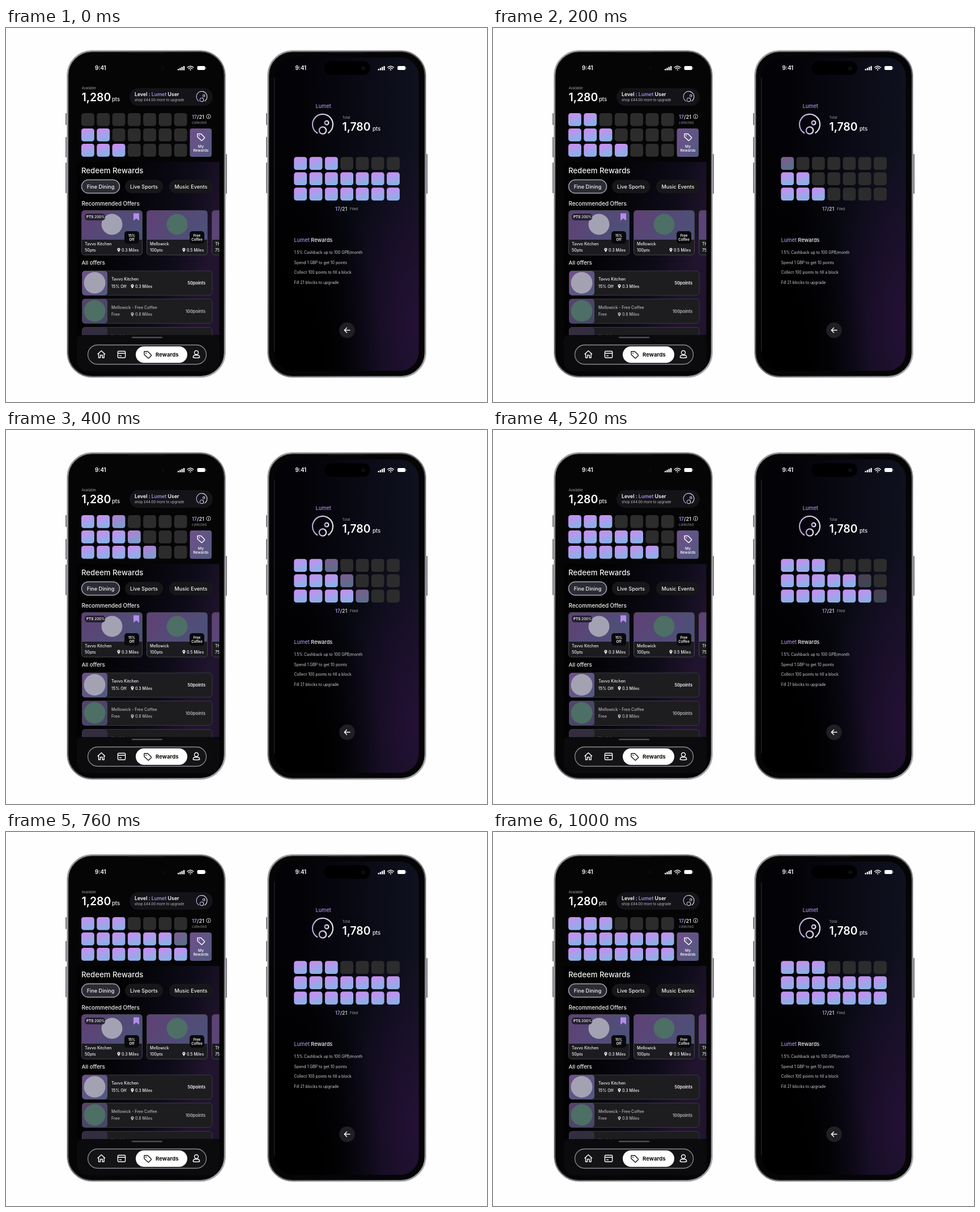
Recreate the animation shown at these times as an HTML page. Size 849 px wide and 659 px high, loop 1.08 s.

```html
<!DOCTYPE html>
<html lang="en">
<head>
<meta charset="utf-8">
<title>Rewards app</title>
<style>
  html, body { margin: 0; width: 100%; height: 100%; overflow: hidden; background: #fefefe; }
  svg { display: block; width: 849px; height: 659px; font-family: Inter, "Open Sans", sans-serif; }
  .line { fill: none; stroke: #fff; stroke-width: 1.4; stroke-linecap: round; stroke-linejoin: round; }
</style>
</head>
<body>
<svg id="stage" viewBox="0 0 849 659">
  <defs>
    <linearGradient id="tile" x1=".2" y1="0" x2=".6" y2="1">
      <stop offset=".1" stop-color="#c68ff0"/><stop offset="1" stop-color="#84b4e6"/>
    </linearGradient>
    <linearGradient id="art" x1="0" y1="0" x2="1" y2=".4">
      <stop stop-color="#604076"/><stop offset="1" stop-color="#4d5078"/>
    </linearGradient>
    <linearGradient id="button" x1="0" y1="0" x2="1" y2="1">
      <stop stop-color="#70508a"/><stop offset="1" stop-color="#515a80"/>
    </linearGradient>
    <linearGradient id="ring" x1="0" y1="0" x2="1" y2="0">
      <stop stop-color="#b9a2d8"/><stop offset="1" stop-color="#e8e8f0"/>
    </linearGradient>
    <linearGradient id="metal" x1="0" y1="0" x2="1" y2="1">
      <stop stop-color="#909094"/><stop offset=".5" stop-color="#5c5c62"/><stop offset="1" stop-color="#a2a2a8"/>
    </linearGradient>
    <linearGradient id="listGlow" x1="0" y1="0" x2="1" y2=".35">
      <stop offset=".3" stop-color="#020203"/><stop offset=".75" stop-color="#0d0b18"/><stop offset="1" stop-color="#21142e"/>
    </linearGradient>
    <linearGradient id="screenBlue" x1="0" y1="0" x2="1" y2="0">
      <stop offset=".2" stop-color="#030307"/><stop offset=".6" stop-color="#090a14"/><stop offset="1" stop-color="#10111f"/>
    </linearGradient>
    <radialGradient id="screenPurple" cx="1" cy=".84" r=".55">
      <stop stop-color="#28103a" stop-opacity=".85"/><stop offset="1" stop-color="#28103a" stop-opacity="0"/>
    </radialGradient>
    <radialGradient id="screenDark" cx="0" cy="1" r=".75">
      <stop offset=".4" stop-color="#000"/><stop offset="1" stop-color="#000" stop-opacity="0"/>
    </radialGradient>
    <clipPath id="listArea"><rect x="125" y="236" width="251.5" height="305"/></clipPath>
  </defs>
</svg>
<script>
const stage = document.getElementById("stage");
const LILAC = "#a98ce0", TIER = "Lumet";
const EATERY = "Tavvo Kitchen", CAFE = "Mellowick";

const rect = (x, y, w, h, r, fill, extra = "") =>
  `<rect x="${x}" y="${y}" width="${w}" height="${h}" rx="${r}" fill="${fill}" ${extra}/>`;
const circle = (x, y, r, fill, extra = "") =>
  `<circle cx="${x}" cy="${y}" r="${r}" fill="${fill}" ${extra}/>`;
const text = (x, y, size, str, fill = "#f2f2f4", weight = 500, anchor = "start") =>
  `<text x="${x}" y="${y}" font-size="${size}" fill="${fill}" font-weight="${weight}" text-anchor="${anchor}">${str}</text>`;
const line = (d, extra = "") => `<path class="line" d="${d}" ${extra}/>`;
const group = (x, y, body, extra = "") => `<g transform="translate(${x} ${y})" ${extra}>${body}</g>`;
const lilac = str => `<tspan fill="${LILAC}">${str}</tspan>`;
const border = (color, width = 1) => `stroke="${color}" stroke-width="${width}"`;

const pin = (x, y) =>
  `<path d="M${x} ${y + 4}c-1-2-2.6-3-2.6-5a2.6 2.6 0 0 1 5.2 0c0 2-1.6 3-2.6 5z" fill="#eee"/>` + circle(x, y - 1, .9, "#222");
const tag = (x, y, color) => group(x, y,
  line("M-6-5.5h6.2l6 6q.8.8 0 1.6l-4 4q-.8.8-1.6 0l-6.6-6.2z", `style="stroke:${color}"`) + circle(-2.8, -2.3, .9, color));
const badge = (x, y, scale) => `<g transform="translate(${x} ${y}) scale(${scale})" fill="none" stroke="url(#ring)" stroke-width="2.2">
  <path d="M-9 15.5A18 18 0 1 1 9.5 15.2"/><circle cx="7" cy="-3" r="3.4"/><circle cx="0" cy="10.5" r="6.2"/></g>`;

function phone(x) {
  const buttons = [[-2, 111, 21], [-2, 153, 36], [-2, 198, 54], [280, 183, 70]]
    .map(([bx, by, h]) => rect(bx, by, 3, h, 1, "#77777d")).join("");
  return group(x, 39, buttons +
    rect(.7, .7, 279.6, 576, 44, "#141416", border("#c3c3c7", 1.4)) +
    rect(2.2, 2.2, 276.6, 573, 42.5, "#050506", border("url(#metal)", 2)) +
    rect(108, 3.5, 64, 1.6, .8, "#1b1b1e"));
}

function statusBar(x) {
  const bars = [0, 1, 2, 3].map(i => rect(146 + i * 3.3, 72 - i * 1.7, 2.3, 2.6 + i * 1.7, .6, "#fff")).join("");
  return group(x, 0, text(0, 74, 9.8, "9:41", "#fff", 600) + bars +
    line("M163.2 69.5q5.3-4.6 10.6 0M165.2 71.7q3.3-2.8 6.6 0") + circle(168.5, 73.7, 1.1, "#fff") +
    rect(180.5, 67, 14, 7, 2, "#fff") + rect(195.2, 69.2, 1, 2.6, .5, "#aaa"));
}

function tiles(id, x, y) {
  let body = "";
  for (let row = 0; row < 3; row++)
    for (let col = 0; col < 7; col++) {
      const px = x + col * 27.3, py = y + (2 - row) * 27;
      body += rect(px, py, 22.8, 22.8, 4.5, "#2c2c2d") +
        rect(px, py, 22.8, 22.8, 4.5, "url(#tile)", `data-row="${row}" data-col="${col}"`);
    }
  return `<g id="${id}">${body}</g>`;
}

function card(x, name, points, miles, logo, offer) {
  const label = offer.map((s, i) => text(89, 46.5 + i * 7.6, 6, s, "#fff", 600, "middle")).join("");
  return group(x, 321,
    rect(.5, .5, 107, 78.5, 5, "#1b1b20", border("#45454d")) +
    `<path d="M1 52V5q0-4 4-4h98q4 0 4 4v47z" fill="url(#art)"/>` + circle(54, 25, 18.5, logo) +
    rect(76, 37, 26, 22, 5, "#09090b") + label +
    text(6, 61.5, 7, name) + text(6, 72.5, 7.2, points) +
    pin(66, 70) + text(71, 72.5, 7, miles));
}

function row(y, name, deal, miles, points, logo, dim) {
  return group(134, y,
    rect(.5, .5, 229.5, 43, 5, "#1d1d20", border("#39393f")) +
    rect(.5, .5, 44.5, 43, 5, "url(#button)", `opacity="${dim}"`) + circle(22.5, 21.5, 19, logo) +
    `<g opacity="${dim}">` + text(52, 17.5, 7.1, name) + text(52, 30, 7.1, deal) +
    pin(89, 27.5) + text(94, 30, 7, miles) + text(218, 24.5, 7.4, points, "#f2f2f4", 600, "end") + `</g>`);
}

const chip = (x, w, label, active) =>
  rect(x, 267.5, w, 23.5, 11.75, active ? "#2b2b33" : "#17171a", active ? border("#a5a5b8", 1.5) : "") +
  text(x + w / 2, 282.5, 9.1, label, "#f2f2f4", 500, "middle");

const points = (x, y, amount, label) =>
  text(x, y - 21, 6, label, "#a0a0a4", 400) + text(x, y, 19.4, amount, "#fff", 600) + text(x + 53.5, y, 9.5, "pts");

function home() {
  const header = points(133.5, 129, "1,280", "Available") +
    rect(218, 106, 147, 31, 15.5, "#131318") +
    text(227, 119.7, 8.8, `Level : ${lilac(TIER)} User`, "#fff", 600) +
    text(227, 129, 6.2, "shop £44.00 more to upgrade", "#bcbcc2", 400) + badge(345.5, 121, .52) +
    tiles("left", 133, 150) +
    text(328, 160, 9, `${lilac("17")}/21`, "#ddd", 600) +
    circle(357.5, 156, 3.8, "none", border("#ddd", .9)) + line("M357.5 155.6v2.3M357.5 153.9v.1", `style="stroke-width:1"`) +
    text(328, 169, 6, "collected", "#929298", 400) +
    rect(324.5, 177, 38.5, 50, 4, "url(#button)") + tag(344, 192, "#fff") +
    text(344, 210.5, 6.6, "My", "#fff", 500, "middle") + text(344, 218, 6.6, "Rewards", "#fff", 500, "middle");

  const list = rect(125, 236, 252, 306, 0, "url(#listGlow)") +
    text(133, 256, 13.2, "Redeem Rewards") +
    chip(133.5, 67, "Fine Dining", true) + chip(210, 67, "Live Sports") + chip(288, 77, "Music Events") +
    text(133.5, 312.5, 9.8, "Recommended Offers") +
    card(133, EATERY, "50pts", "0.3 Miles", "#a3a2b2", ["15%", "Off"]) +
    rect(139, 327, 36, 12, 5, "#25202f") + text(142, 335.3, 6.3, "<tspan font-weight='700'>PTS</tspan> 200%") +
    `<path d="M225 326.5h10v13l-5-4-5 4z" fill="#b48cea"/>` +
    card(248, CAFE, "100pts", "0.5 Miles", "#4d6f65", ["Free", "Coffee"]) +
    card(363, "TH", "75pts", "", "none", []) +
    text(133.5, 417, 9.6, "All offers") +
    row(427.5, EATERY, "15% Off", "0.3 Miles", "50points", "#a3a2b2", 1) +
    row(477, CAFE + " - Free Coffee", "Free", "0.8 Miles", "100points", "#4d6f65", .72) +
    row(527, "", "", "", "", "none", .3) + text(186, 545.5, 7.1, "Nordale", "#77777d");

  const nav = `<path d="M125 551q0-10 10-10h232q10 0 10 10v38q-4 16-20 16H145q-16 0-20-16z" fill="#0b0b0d"/>` +
    rect(222, 544, 54, 2.6, 1.3, "#4d4d53") +
    rect(144.5, 558.5, 209, 34, 17, "#141417", border("#8b8b94", 1.3)) +
    line("M162 574.5l6.3-5.8 6.3 5.8M163.5 573.5v7.5h3v-4.5h3.6v4.5h3v-7.5") +
    line("M199 569.5h10q1.6 0 1.6 1.6v8.3q0 1.6-1.6 1.6h-10q-1.6 0-1.6-1.6v-8.3q0-1.6 1.6-1.6zM197.5 573.3h13M200.5 577.5h3") +
    rect(229, 561, 91, 29, 14.5, "#fff") + tag(250, 575.5, "#17171a") +
    text(264, 579, 9.6, "Rewards", "#0c0c0e", 700) +
    circle(336, 572, 3.5, "none", border("#fff", 1.4)) + line("M330.3 580.5q0-4 3.5-4h4.4q3.5 0 3.5 4q-5.7 1.8-11.4 0z");

  return phone(107) + circle(277, 71, 3, "#0a0a0f") + statusBar(157) + header +
    `<g clip-path="url(#listArea)">${list}</g>` + nav;
}

function detail() {
  const facts = ["1.5% Cashback up to 100 GPB/month", "Spend 1 GBP to get 10 points",
    "Collect 100 points to fill a block", "Fill 21 blocks to upgrade"];
  const layers = ["screenBlue", "screenPurple", "screenDark"]
    .map(id => rect(474, 52, 254.5, 552, 33, `url(#${id})`)).join("");
  return phone(461) + layers + rect(473.5, 88, .8, 482, .4, "#3a3a40") +
    rect(562, 58.5, 81, 24, 12, "#000") + circle(630.5, 71, 3.5, "#0d0d18") + statusBar(510.5) +
    text(546.5, 140.5, 9.2, TIER, LILAC) + badge(559, 170, 1) + points(593.5, 181, "1,780", "Total") +
    tiles("right", 508.3, 227.3) +
    text(581, 321.7, 8.7, `${lilac("17")}/21`, "#ccc", 600) + text(607, 321, 6.2, "Filed", "#a5a5aa", 400) +
    text(508.5, 377, 9.2, `${lilac(TIER)} Rewards`) +
    facts.map((s, i) => text(508.5, 398 + i * 17.5, 6.9, s, "#d0d0d4", 400)).join("") +
    circle(602, 532.5, 13.8, "#202024") + line("M607 532.5h-9.5M601.5 528.3l-4.2 4.2 4.2 4.2");
}

stage.insertAdjacentHTML("beforeend", home() + detail());

// Fill level over time, as [ms, level]; a diagonal of tiles fills per unit.
const grids = [
  { id: "left", topStart: 3,
    keys: [[0, 3], [120, 3], [200, 4], [280, 4], [420, 5], [500, 6], [520, 6], [620, 7], [680, 7.1], [760, 7.5], [800, 8], [1080, 8]] },
  { id: "right", topStart: 2.5,
    keys: [[0, 8], [119, 8], [120, 2], [200, 3], [280, 3.1], [400, 4.5], [520, 6.2], [600, 6.7], [640, 7], [680, 7.3], [760, 8], [1080, 8]] }
].map(g => ({ ...g, tiles: [...document.querySelectorAll(`#${g.id} [data-row]`)] }));

function levelAt(keys, t) {
  const i = keys.findIndex(k => k[0] > t);
  const [t0, a] = keys[i - 1], [t1, b] = keys[i];
  return a + (b - a) * (t - t0) / (t1 - t0);
}

function fillOf(row, col, level, topStart) {
  if (row === 2 && col > 2) return 0;
  const start = row === 2 ? Math.max(topStart, col + 2) : row + col;
  return Math.min(1, Math.max(0, level - start));
}

function draw(now) {
  const t = Math.floor(now % 1080 / 40) * 40;
  for (const { tiles, keys, topStart } of grids) {
    const level = levelAt(keys, t);
    for (const el of tiles)
      el.setAttribute("opacity", fillOf(+el.dataset.row, +el.dataset.col, level, topStart));
  }
  requestAnimationFrame(() => draw(performance.now()));
}
draw(performance.now());
</script>
</body>
</html>
```
